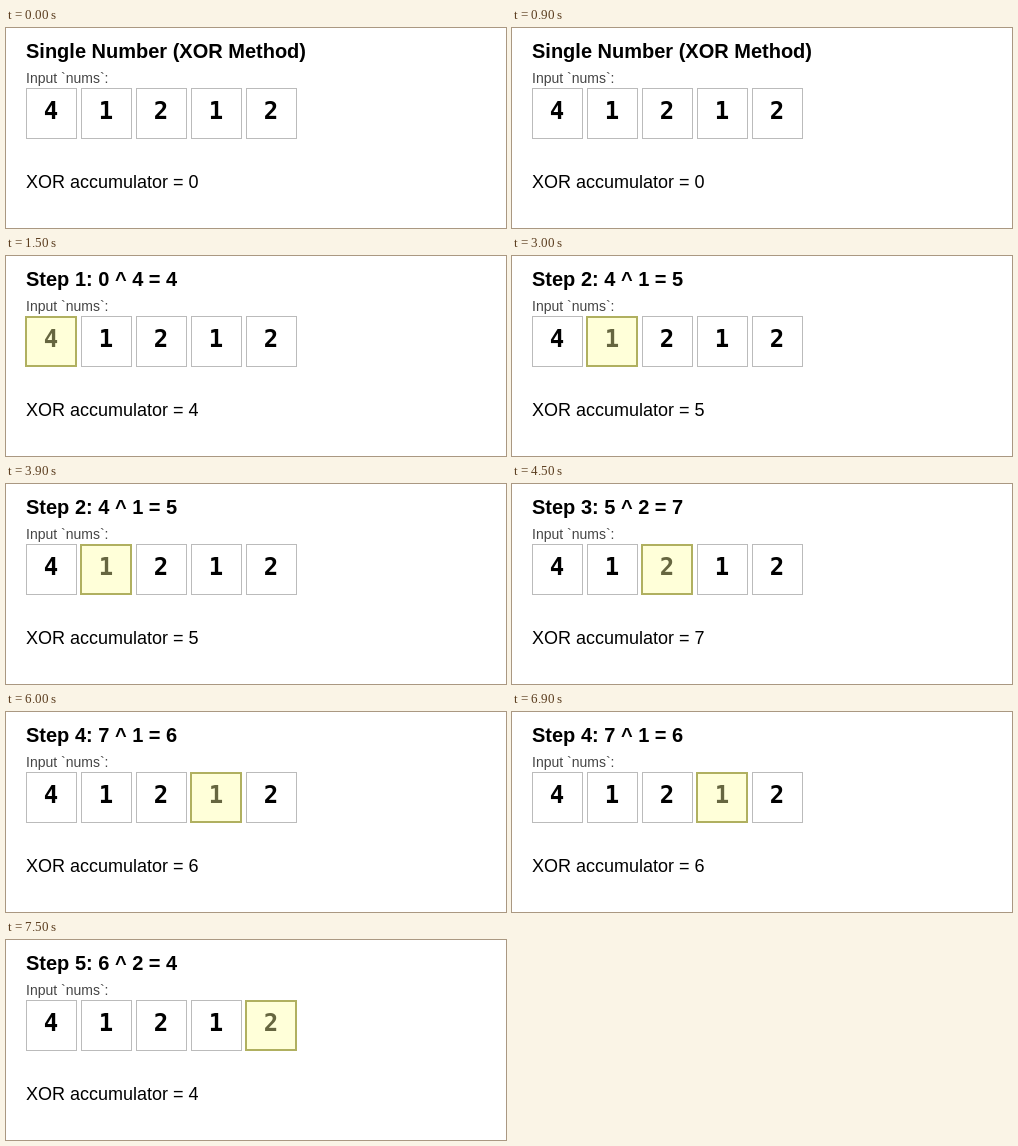
Recreate the animation shown at these times as an HTML page. Size 500 by 200 pixels, loop 8 s.

```html
<!DOCTYPE html>
<html lang="en">
<head>
<meta charset="utf-8">
<title>Single Number</title>
<style>
  html, body { margin: 0; width: 100%; height: 100%; overflow: hidden; background: #fff; }
  svg { display: block; width: 500px; height: 200px; font-family: "Liberation Sans", Arial, sans-serif; }
  #title { font-size: 20px; font-weight: bold; }
  #label { font-size: 14px; fill: #444; }
  #total { font-size: 18px; }
  #cells rect { fill: #fff; stroke: #bbb; }
  #cells text { font: bold 24px "DejaVu Sans Mono", monospace; text-anchor: middle; }
  #marker { fill: #ffffa0; fill-opacity: .4; stroke: #b0b060; stroke-width: 2; }
</style>
</head>
<body>
<svg viewBox="0 0 500 200">
  <text id="title" x="20" y="30"></text>
  <text id="label" x="20" y="55">Input `nums`:</text>
  <g id="cells"></g>
  <rect id="marker" y="61" width="50" height="49"/>
  <text id="total" x="20" y="160"></text>
</svg>
<script>
const LOOP = 8000, STEP = 1500, PITCH = 55;
const nums = [4, 1, 2, 1, 2];
const byId = id => document.getElementById(id);

byId("cells").innerHTML = nums.map((n, i) => {
  const x = 20 + i * PITCH;
  return `<rect x="${x + 0.5}" y="60.5" width="50" height="50"/><text x="${x + 25}" y="91">${n}</text>`;
}).join("");

let shown = -1;

function show(step) {
  const before = nums.slice(0, Math.max(step - 1, 0)).reduce((a, b) => a ^ b, 0);
  const n = nums[step - 1];
  const after = step ? before ^ n : 0;
  byId("title").textContent = step
    ? `Step ${step}: ${before} ^ ${n} = ${after}`
    : "Single Number (XOR Method)";
  byId("total").textContent = `XOR accumulator = ${after}`;
  byId("marker").setAttribute("visibility", step ? "visible" : "hidden");
  byId("marker").setAttribute("x", 20 + (step - 1) * PITCH);
}

function tick() {
  const step = Math.floor(performance.now() % LOOP / STEP);
  if (step !== shown) show(shown = step);
  requestAnimationFrame(tick);
}
tick();
</script>
</body>
</html>
```
